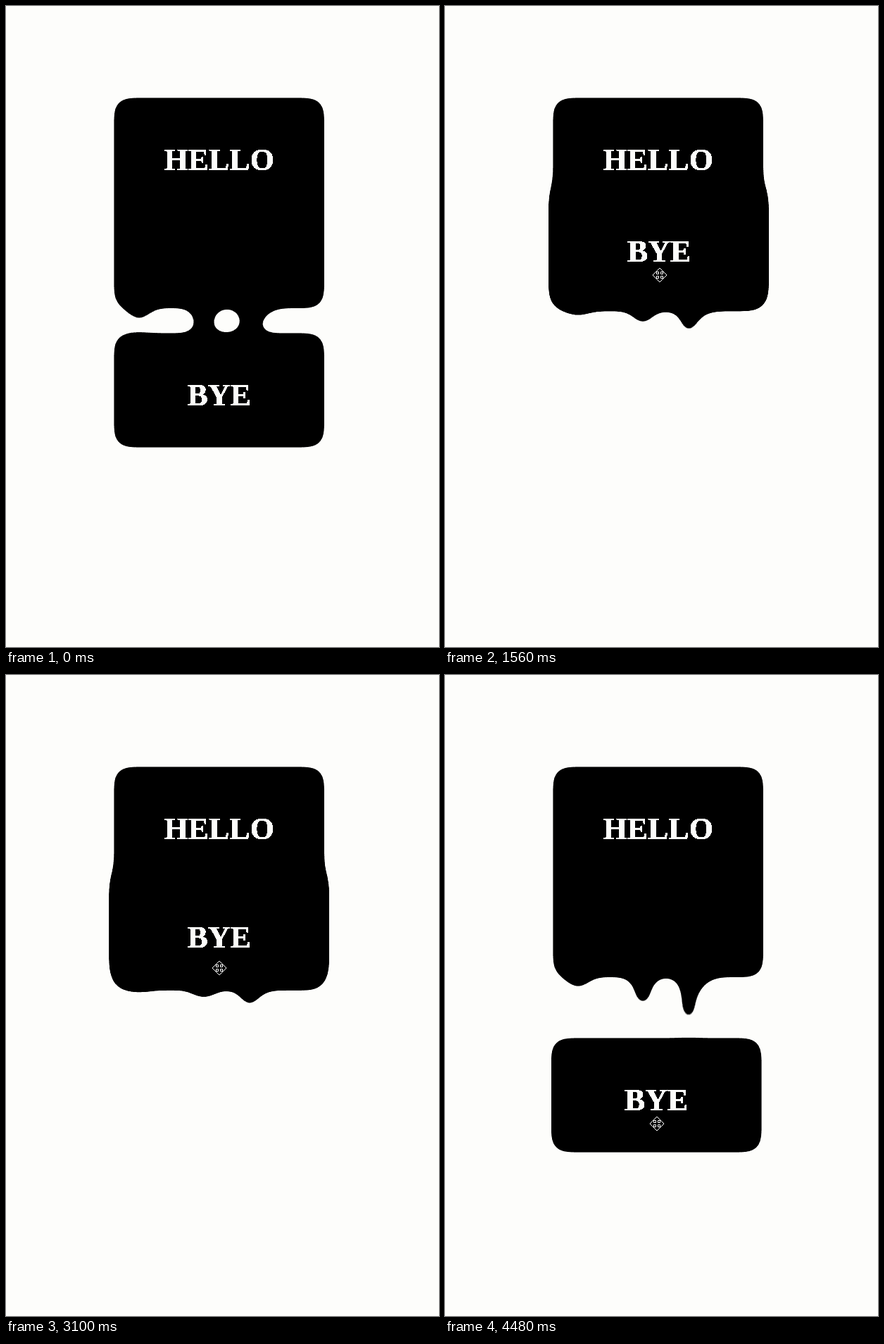
An HTML page that plays this animation: 615x910 px, repeating every 4840 ms.

```html
<!DOCTYPE html>
<html lang="en">
<head>
<meta charset="utf-8">
<title>Gooey boxes</title>
<style>
  html, body { margin: 0; width: 615px; height: 910px; overflow: hidden; background: #fdfdfb; }
  svg { position: absolute; left: 0; top: 0; }
  /* Blurred layers pushed through strong contrast melt into each other. */
  #goo { position: absolute; width: 615px; height: 910px; background: #fff; filter: contrast(40); mix-blend-mode: multiply; }
  .soft { filter: blur(13.5px); }
  text { font: bold 44px "Liberation Serif", "Times New Roman", serif; fill: #fff; stroke: #fff; stroke-width: .6px; text-anchor: middle; }
  #move path, #arrow { stroke: #fff; }
</style>
</head>
<body>
<div id="goo">
  <svg width="615" height="910">
    <g class="soft"><path id="upper"/></g>
    <text x="302.700" y="233.300">HELLO</text>
    <g class="soft"><rect id="lower" width="298.600" height="162"/></g>
    <text id="bye">BYE</text>
  </svg>
</div>
<svg width="615" height="910">
  <g id="move">
    <path d="M0-10L10 0 0 10-10 0Z"/>
    <path d="M-4.5-4.5h3v3h-3zM1.5-4.5h3v3h-3zM-4.5 1.5h3v3h-3zM1.5 1.5h3v3h-3z"/>
  </g>
  <path id="arrow" d="M0 0V16L4 12.500 6.500 18 9 17 6.500 11.500H11.500Z"/>
</svg>
<script>
const LOOP = 4840, LAST = 95, FLOOR = 429;
const $ = id => document.getElementById(id);
const clamp = (v, lo, hi) => Math.min(hi, Math.max(lo, v));

// Turning points of the dragged box
const drag = [
  { step: 14, top: 465, dx: 0 },
  { step: 18, top: 448, dx: 0 },
  { step: 33, top: 261, dx: 1.5 },
  { step: 54, top: 177, dx: 0 },
  { step: 66, top: 285, dx: 0 },
  { step: 81, top: 486, dx: -1.5 },
  { step: LAST, top: 516, dx: -2.5 }
];

const drips = [
  { x: 189, width: 22, depth: 19 },
  { x: 281, width: 22, depth: 44 },
  { x: 346, width: 20, depth: 67 }
];

// Picture steps come in uneven groups of 100, 20 and 20 ms.
function stepAt(ms) {
  if (ms < 140) return 0;
  const group = Math.floor((ms - 20) / 140), rest = (ms - 20) % 140;
  return Math.min(LAST, group * 3 + (rest < 100 ? 0 : rest < 120 ? 1 : 2));
}

function slope(i, name) {
  const a = drag[i - 1], b = drag[i + 1];
  return a && b ? (b[name] - a[name]) / (b.step - a.step) : 0;
}

// Smooth Hermite curve through the turning points
function track(step, name) {
  const n = clamp(step, drag[0].step, LAST);
  let i = 0;
  while (i < drag.length - 2 && n > drag[i + 1].step) i++;
  const a = drag[i], b = drag[i + 1], span = b.step - a.step;
  const u = (n - a.step) / span, v = 1 - u;
  return a[name] * (1 + 2 * u) * v * v + b[name] * u * u * (3 - 2 * u)
    + span * u * v * (slope(i, name) * v - slope(i + 1, name) * u);
}

// Upper box with tapering drips and a curved shoulder beside the longest one
function upperPath(stretch) {
  const taper = ({ x, width, depth }) => {
    const half = width / 2;
    return `M${x - half - 2} ${FLOOR}H${x + half + 2}L${x + half} ${FLOOR + depth * stretch}H${x - half}Z`;
  };
  const shoulder = `M350 ${FLOOR}H385Q358 ${FLOOR + 6 * stretch} 355 ${FLOOR + 40 * stretch}Z`;
  return `M153.4 130.4H452V${FLOOR}H153.4Z` + drips.map(taper).join("") + shoulder;
}

function put(el, x, y) {
  el.setAttribute("transform", `translate(${x} ${y})`);
}

function drawCursor(step, top, dx) {
  const away = 1 - clamp((step - 2) / 8, 0, 1);
  const fall = Math.max(0, track(step + 0.5, "top") - track(step - 0.5, "top"));
  const x = Math.round(303.4 + dx + 250 * away ** 1.5);
  const y = Math.round(top + 120.5 + 0.9 * fall - 20 * away);
  const overBox = x < 452;
  $("move").style.display = step >= 2 && overBox ? "" : "none";
  $("arrow").style.display = step >= 2 && !overBox ? "" : "none";
  put($("move"), x, y);
  put($("arrow"), x, y);
}

function draw(now) {
  const step = stepAt(now % LOOP);
  const top = track(step, "top"), dx = track(step, "dx");

  // Drips retract as the lower box slides over the upper one.
  $("upper").setAttribute("d", upperPath(clamp((top - 94) / 277, 0, 1)));
  put($("lower"), 153.4 + dx, top - 0.5);
  put($("bye"), 302.700 + dx, top + 102.3);
  drawCursor(step, top, dx);
  requestAnimationFrame(draw);
}
requestAnimationFrame(draw);
</script>
</body>
</html>
```
